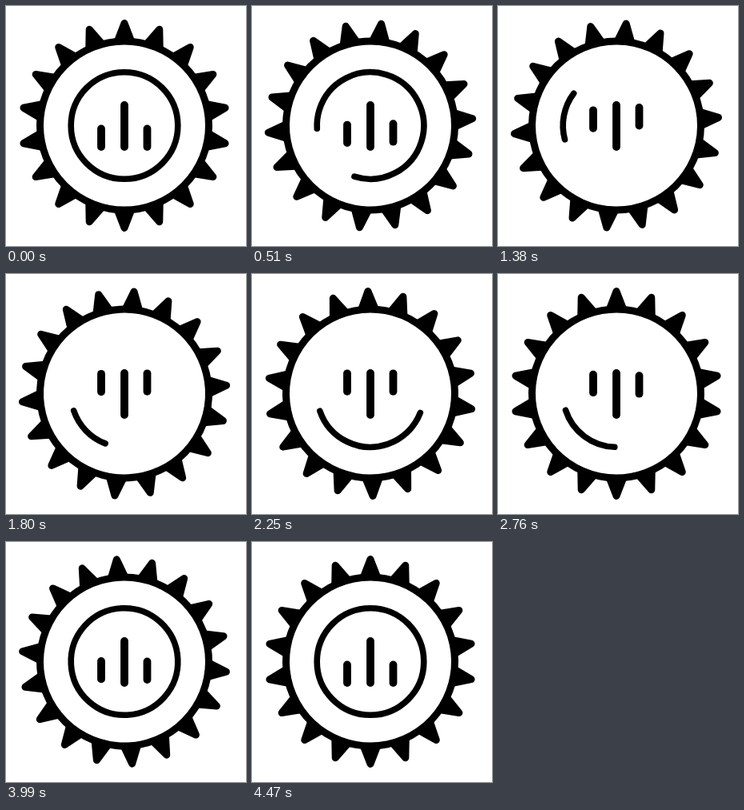
An HTML page with a canvas that plays this animation: 300 by 300 pixels, repeating every 4.5 s.

```html
<!DOCTYPE html>
<html lang="en">
<head>
<meta charset="utf-8">
<title>Gear face</title>
<style>
  html, body { margin: 0; width: 100%; height: 100%; overflow: hidden; background: #fff; }
  canvas { display: block; width: 300px; height: 300px; }
</style>
</head>
<body>
<canvas id="stage"></canvas>
<script>
const LOOP = 4500, STEP = 30, SIZE = 300;
const CX = 148, CY = 149.5, TEETH = 18;
const RAD = Math.PI / 180;

const canvas = document.getElementById('stage');
const ctx = canvas.getContext('2d');
const scale = window.devicePixelRatio || 1;
canvas.width = canvas.height = SIZE * scale;

// Smooth 0..1 progress between two times
function ease(t, from, to) {
  const x = Math.min(1, Math.max(0, (t - from) / (to - from)));
  return x * x * (3 - 2 * x);
}

// Rises over the first span, falls back over the second
function there(t, a, b, c, d) {
  return ease(t, a, b) - ease(t, c, d);
}

function drawGear(angle) {
  ctx.save();
  ctx.translate(CX, CY);
  ctx.rotate(angle * RAD);
  ctx.lineWidth = 9;
  ctx.beginPath();
  ctx.arc(0, 0, 105.5, 0, 2 * Math.PI);
  ctx.stroke();
  for (let i = 0; i < TEETH; i++) {
    ctx.beginPath();
    ctx.moveTo(0, -128);
    ctx.lineTo(8.5, -106);
    ctx.lineTo(-8.5, -106);
    ctx.closePath();
    ctx.fill();
    ctx.stroke();
    ctx.rotate(2 * Math.PI / TEETH);
  }
  ctx.restore();
}

// Arc measured counter-clockwise from the seam on the left
function drawArc(from, to, turn) {
  if (to - from < 0.5) return;
  ctx.lineWidth = 7.6;
  ctx.beginPath();
  ctx.arc(CX, CY, 66.8, (180 - turn - from) * RAD, (180 - turn - to) * RAD, true);
  ctx.stroke();
}

function drawBar(x, top, bottom, rise = 0) {
  ctx.lineWidth = 9.8;
  ctx.beginPath();
  ctx.moveTo(x, top - rise);
  ctx.lineTo(x, bottom - rise);
  ctx.stroke();
}

function draw(t) {
  ctx.setTransform(scale, 0, 0, scale, 0, 0);
  ctx.fillStyle = '#fff';
  ctx.fillRect(0, 0, SIZE, SIZE);
  ctx.fillStyle = ctx.strokeStyle = '#000';
  ctx.lineCap = ctx.lineJoin = 'round';

  drawGear(80 * ease(t, 120, 2430) + 20 * ease(t, 2800, 4500));

  const lift = there(t, 0, 1950, 2500, 4490);
  const earlyLift = there(t, 0, 1700, 2340, 4490);
  const erased = there(t, 0, 1815, 2750, 3670);
  const smile = there(t, 1500, 2240, 2500, 3020);
  drawArc(360 * erased, 360, 19 * lift);
  drawArc(0, 140 * smile, 19 * lift);

  drawBar(119, 153.5, 176, 29.2 * lift);
  drawBar(148, 124, 176);
  drawBar(176.5, 153.5, 176, 29.2 * earlyLift);
}

const start = performance.now();
function tick() {
  const t = (performance.now() - start) % LOOP;
  draw(Math.floor(t / STEP) * STEP);
  requestAnimationFrame(tick);
}
tick();
</script>
</body>
</html>
```
